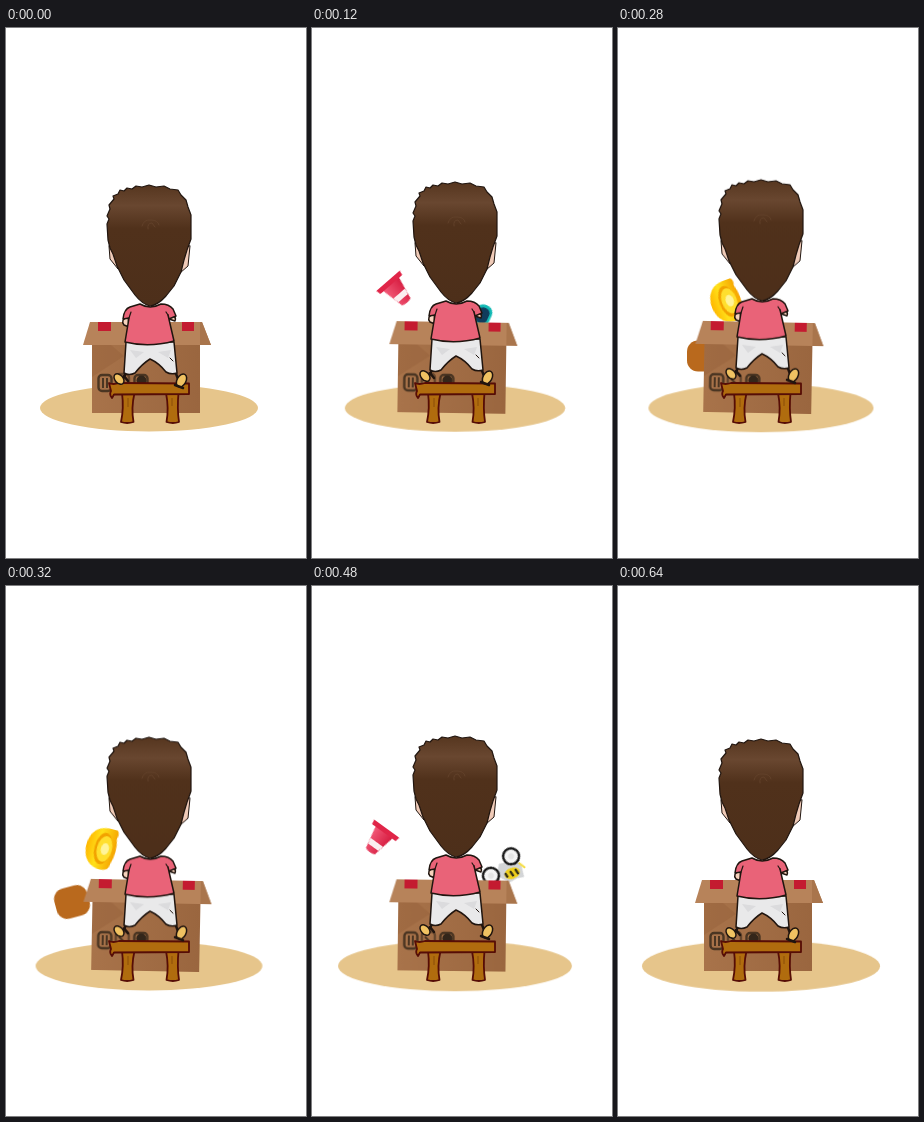
Animation, 300 px wide and 530 px high, one loop 0.68 s. Source, as an HTML page without scripts:

```html
<!DOCTYPE html>
<html lang="en">
<head>
<meta charset="utf-8">
<title>Unpacking a box</title>
<style>
  html, body { margin: 0; width: 100%; height: 100%; overflow: hidden; background: #fff; }
  svg { display: block; width: 100%; height: 100%; }

  /* 17 steps of 40 ms; every segment is stepped to keep that cadence */
  .sand, .box, .boy, .toy { animation: 680ms step-end infinite; }
  .sand { animation-name: spread; transform-origin: 143px 380px; }
  .box { animation-name: tilt; transform-origin: 140px 340px; }
  .boy { animation-name: rise; }
  .toy { opacity: 0; }
  .cone-a { animation-name: cone-a; }
  .cone-b { animation-name: cone-b; }
  .glasses { animation-name: glasses; }
  .ingot { animation-name: ingot; }
  .lump { animation-name: lump; }
  .bike { animation-name: bike; }

  @keyframes spread {
    0% { transform: scale(1); animation-timing-function: steps(5); }
    29.41% { transform: scale(1.018); animation-timing-function: steps(5); }
    58.82% { transform: scale(1.055); animation-timing-function: steps(2); }
    70.58% { transform: scale(1.073); animation-timing-function: steps(4); }
    94.11%, 100% { transform: scale(1.092); }
  }
  @keyframes tilt {
    0% { transform: rotate(0deg); animation-timing-function: steps(3); }
    17.64% { transform: rotate(.8deg); animation-timing-function: steps(5); }
    47.05% { transform: rotate(1.1deg); animation-timing-function: steps(4); }
    70.58% { transform: rotate(.7deg); animation-timing-function: steps(3); }
    88.23%, 100% { transform: rotate(0deg); }
  }
  @keyframes rise {
    0% { transform: translateY(0); animation-timing-function: steps(3); }
    17.64% { transform: translateY(-3px); animation-timing-function: steps(2); }
    29.41% { transform: translateY(-4px); animation-timing-function: steps(5); }
    58.82% { transform: translateY(-7px); }
    70.58% { transform: translateY(-7px); animation-timing-function: steps(2); }
    82.35% { transform: translateY(-5px); animation-timing-function: steps(2); }
    94.11%, 100% { transform: translateY(-4px); }
  }
  @keyframes cone-a {
    0% { opacity: 0; }
    11.76% { opacity: 1; transform: translate(88px, 270px) rotate(-66deg); }
    17.64% { transform: translate(78px, 255px) rotate(-41deg); }
    23.52% { transform: translate(73px, 249px) rotate(-15deg); }
    29.41% { transform: translate(70px, 247px) rotate(10deg); }
    35.29% { transform: translate(65px, 250px) rotate(35deg); }
    41.17% { opacity: 0; }
  }
  @keyframes cone-b {
    0% { opacity: 0; }
    58.82% { opacity: 1; transform: translate(75px, 278px) rotate(-43deg); }
    64.7% { transform: translate(75px, 258px) rotate(-4deg); }
    70.58% { transform: translate(73px, 245px) rotate(36deg); }
    76.47% { transform: translate(69px, 246px) rotate(70deg); }
    82.35% { opacity: 0; }
  }
  @keyframes glasses {
    0% { opacity: 0; }
    17.64% { opacity: 1; transform: translate(164px, 302px) rotate(-66deg); }
    23.52% { transform: translate(179px, 288px) rotate(-53deg); }
    29.41% { transform: translate(195px, 276px) rotate(-41deg); }
    35.29% { transform: translate(211px, 268px) rotate(-29deg); }
    41.17% { opacity: 0; }
  }
  @keyframes ingot {
    0% { opacity: 0; }
    41.17% { opacity: 1; transform: translate(108px, 274px) rotate(-110deg); }
    47.05% { transform: translate(95px, 262px) rotate(-75deg); }
    52.94% { transform: translate(84px, 249px) rotate(-35deg); }
    58.82% { transform: translate(74px, 241px) rotate(5deg); }
    64.7% { transform: translate(66px, 240px) rotate(40deg); }
    70.58% { opacity: 0; }
  }
  @keyframes lump {
    0% { opacity: 0; }
    41.17% { opacity: 1; transform: translate(86px, 328px); }
    47.05% { transform: translate(66px, 316px) rotate(-15deg); }
    52.94% { transform: translate(48px, 304px) rotate(15deg); }
    58.82% { transform: translate(31px, 295px) rotate(40deg); }
    64.7% { opacity: 0; }
  }
  @keyframes bike {
    0% { opacity: 0; }
    64.7% { opacity: 1; transform: translate(175px, 293px) rotate(-44deg); }
    70.58% { transform: translate(189px, 280px) rotate(-44deg); }
    76.47% { transform: translate(203px, 271px) rotate(-44deg); }
    82.35% { opacity: 0; }
  }
</style>
</head>
<body>
<svg viewBox="0 0 300 530" preserveAspectRatio="none">
  <defs>
    <linearGradient id="hair" x2="0" y2="1">
      <stop offset="0" stop-color="#56361f"/>
      <stop offset=".17" stop-color="#694730"/>
      <stop offset=".36" stop-color="#50311b"/>
      <stop offset="1" stop-color="#4d2f1a"/>
    </linearGradient>
    <linearGradient id="gold" x2="0" y2="1">
      <stop offset="0" stop-color="#ffb700"/>
      <stop offset=".4" stop-color="#ffe11a"/>
      <stop offset="1" stop-color="#f5a300"/>
    </linearGradient>
    <linearGradient id="red">
      <stop offset="0" stop-color="#f25a78"/>
      <stop offset="1" stop-color="#d61c40"/>
    </linearGradient>
    <linearGradient id="card">
      <stop offset="0" stop-color="#a8734a"/>
      <stop offset="1" stop-color="#9a663f"/>
    </linearGradient>
    <g id="cone">
      <path d="M-10.500,1H10.500L5.500,25Q0,27-5.500,25Z" fill="url(#red)"/>
      <path d="M-7.700,14H7.700L6.300,20H-6.300Z" fill="#fbeef0"/>
      <path d="M-15.500-3L15.500-3L14.500,2H-14.500Z" fill="#e02548"/>
    </g>
    <g id="lens">
      <rect x="-11" y="-8.500" width="22" height="17" rx="7.500" fill="#12b9b4"/>
      <rect x="-8" y="-6" width="16" height="12" rx="5.500" fill="#103c5c"/>
    </g>
    <g id="wheel">
      <circle r="8" fill="#f4f4f4" stroke="#181818" stroke-width="2.400"/>
      <circle r="3" fill="#e4e4e4"/>
    </g>
    <rect id="mark" width="13" height="16" rx="3.500" fill="none" stroke="#4a3522" stroke-width="2.400"/>
  </defs>

  <ellipse class="sand" cx="143" cy="380" rx="109" ry="23.500" fill="#e6c58b"/>

  <g class="toy lump"><rect x="-17" y="-15.500" width="34" height="31" rx="11" fill="#b9691d"/></g>
  <g class="toy ingot">
    <path d="M-21,4C-21-9-11-15 0-15S21-9 21,4L21,12Q18,15 13,13Q0,17-13,13Q-21,13-21,4Z" fill="url(#gold)"/>
    <ellipse cy="2" rx="16" ry="8.500" fill="#f2a200"/>
    <ellipse cy="3.500" rx="13" ry="7.500" fill="#ffdf2e"/>
    <ellipse cy="4" rx="6" ry="4" fill="#fff49a"/>
  </g>
  <use class="toy cone-a" href="#cone"/>
  <use class="toy cone-b" href="#cone"/>
  <g class="toy glasses">
    <path d="M-8-3Q0-7 8-3" fill="none" stroke="#12b9b4" stroke-width="4"/>
    <use href="#lens" x="-16"/>
    <use href="#lens" x="16"/>
  </g>
  <g class="toy bike">
    <path d="M-10,4L0-3L13,5L15,14L9,24L3,20L-5,18Z" fill="#d3d5d7"/>
    <ellipse cx="3" cy="13" rx="8" ry="5.500" transform="rotate(22 3 13)" fill="#f0d01c"/>
    <path d="M-2,8L-3,13M3,10L2,16M8,12L7,18" stroke="#2a2718" stroke-width="2.200"/>
    <path d="M15,10L16,18" stroke="#f5dc3a" stroke-width="2"/>
    <use href="#wheel" x="-14"/>
    <use href="#wheel" x="14"/>
  </g>

  <g class="box">
    <path d="M86,315H194V385H86Z" fill="url(#card)"/>
    <path d="M86,317H105L118,328L86,349Z" fill="#946039" opacity=".4"/>
    <path d="M84,294H196L205,317H77Z" fill="#b7835a"/>
    <path d="M194,294H196L205,317H194Z" fill="#a9754c"/>
    <path d="M92,294H105V303H92ZM176,294H188V303H176Z" fill="#c41b30"/>
    <use href="#mark" x="92.500" y="347"/>
    <use href="#mark" x="110" y="346" opacity=".7"/>
    <use href="#mark" x="128.500" y="347"/>
    <path d="M97,350V360M101,350V360M113,351L120,358" stroke="#4a3522" stroke-width="2"/>
    <circle cx="135.500" cy="352.500" r="5" fill="#33261a"/>
  </g>

  <g fill="#b06c0e" stroke="#560d06" stroke-width="1.800" stroke-linejoin="round">
    <path d="M116,365H128.500Q125,380 127.500,394Q121,396 115,394Q118,380 116,365Z"/>
    <path d="M160,365H172.500Q171,380 173,394Q167,396 160.500,394Q163,380 160,365Z"/>
    <path d="M103,355Q107,357 113,355L183,355.500V366L108,366.500L106,370Q103,367 105,363Z"/>
    <path d="M122,370V379M166,370V378" stroke="#8a4c08" stroke-width="1"/>
  </g>

  <g class="boy" stroke="#20150f" stroke-width="1.500" stroke-linejoin="round" stroke-linecap="round">
    <path d="M121,343L117,351M169,343L172,351" fill="none" stroke-width="2.500"/>
    <ellipse cx="113" cy="351" rx="6" ry="4" transform="rotate(48 113 351)" fill="#f0c262"/>
    <ellipse cx="175.500" cy="352.500" rx="7" ry="4.500" transform="rotate(-62 175.500 352.500)" fill="#f0c262"/>
    <path d="M118,348L122,353M169,357L177,360" fill="none" stroke-width="2.500"/>
    <path d="M120,314H168L171,345Q165,347 160,344Q153,335 144,331Q136,336 129,345Q123,348 118,345Z" fill="#e9e9ea"/>
    <path d="M124,322L138,324L130,330ZM152,324L165,322L162,330Z" fill="#dbdbdd" stroke="none"/>
    <path d="M164,330L167,333" fill="none" stroke-width="1"/>
    <path d="M122,288Q114,292 118,297L123,299ZM164,285Q171,289 169,293L163,291Z" fill="#f8d3bd"/>
    <path d="M134,276Q144,282 155,276Q163,276 167,281L170,288L163,291L162,287L168,313Q143,320 119,314L123,290L117,291Q118,281 124,279Z" fill="#e96378"/>
    <path d="M123,290L125,284M162,287L160,284" fill="none" stroke-width="1.200"/>
    <path d="M103,218L104,231L112,241L116,220ZM184,218L182,238L174,245L170,225Z" fill="#f0cbb8" stroke-width="1"/>
    <path d="M102,212L101,196L103,191L101,188L104,181L103,177L108,171L107,168L112,166L114,162L118,163L121,160L126,161L130,158L136,159L143,157L150,159L158,158L164,161L172,162L175,167L180,172L182,179L185,187L185,211L181,222L178,232L175,244L168,258L160,268Q152,277 144,278Q136,276 129,267L118,252L111,238L107,226L104,220Z" fill="url(#hair)" stroke-width="1.200"/>
    <path d="M136,198Q138,191 145,192Q152,192 153,197M142,201Q141,195 146,195L149,199" fill="none" stroke="#62412a" stroke-width="1"/>
  </g>
</svg>
</body>
</html>
```
